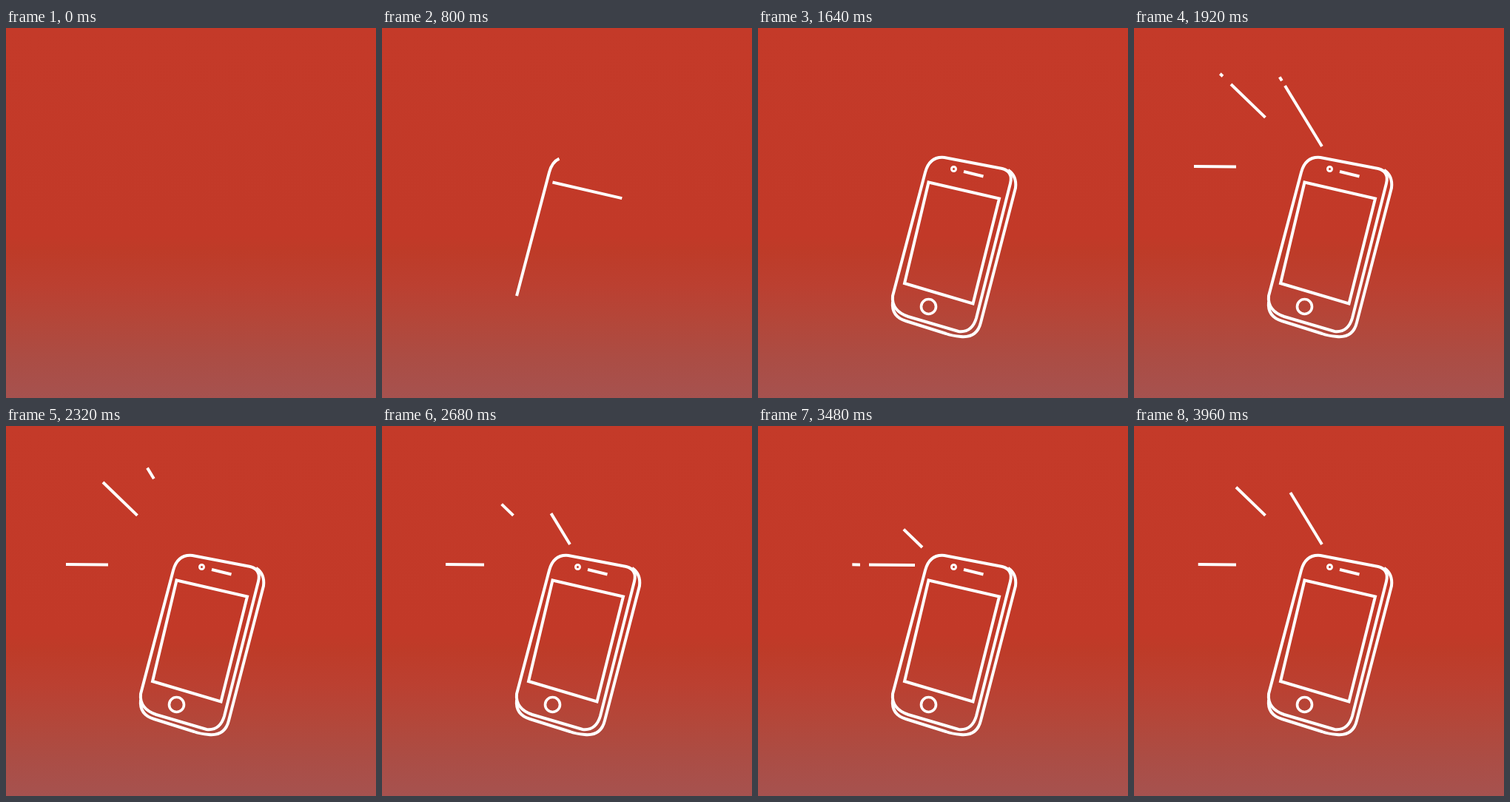
Write an HTML page with a canvas that moves like this. It is 500 by 500 pixels and loops after 4 s.

```html
<!DOCTYPE html>
<html lang="en">
<head>
<meta charset="utf-8">
<title>Ringing phone</title>
<style>
  html, body { margin: 0; width: 100%; height: 100%; overflow: hidden; background: #c33929; }
  canvas { display: block; width: 500px; height: 500px; }
</style>
</head>
<body>
<canvas id="stage" width="500" height="500"></canvas>
<script>
const ctx = document.getElementById('stage').getContext('2d');
const LOOP = 4000, STEP = 40;

const backdrop = ctx.createLinearGradient(0, 0, 0, 500);
[[0, '#c43a29'], [0.56, '#c23928'], [0.6, '#be3b28'], [0.7, '#bb4031'],
 [0.8, '#b3473a'], [0.9, '#ab4d45'], [1, '#a6524f']]
  .forEach(([at, color]) => backdrop.addColorStop(at, color));

// An outline that draws itself between two times.
function outline(d, start, end, width = 4) {
  const el = document.createElementNS('http://www.w3.org/2000/svg', 'path');
  el.setAttribute('d', d);
  return { path: new Path2D(d), length: el.getTotalLength(), start, end, width };
}

const circle = (x, y, r) =>
  `M${x - r},${y} a${r},${r} 0 1 1 ${2 * r},0 a${r},${r} 0 1 1 ${-2 * r},0 Z`;

const phone = [
  outline('M182,362 L226,195 Q232,173 252,175 L330,190 Q345,194 341,210 ' +
          'L295,392 Q289,412 271,410 L203,390 Q180,382 182,362 Z', 660, 1120),
  outline('M338,192 Q350,200 348,216 L301,398 Q296,419 274,417 ' +
          'Q262,416 254,413 L200,396 Q180,390 182,370', 800, 1290),
  outline('M230.5,208.5 L326,230.5 L290.5,372.5 L198,345 Z', 720, 1120),
  outline(circle(230.5, 376.5, 10), 840, 1120, 3.6),
  outline(circle(264.5, 190.5, 3), 1120, 1360, 3),
  outline('M278,194 L304.5,200.5', 1118, 1300)
];

// Rays: dashes are [from, to] distances along the line; hold keeps the last dash.
const SPEED = 0.7, LINGER = 24;
const rays = [
  { from: [212, 188], to: [81, 187], hold: 90, dashes: [[0, 62], [74, 131]],
    starts: [1642, 2110, 2500, 2861, 3105, 3359, 3781] },
  { from: [222, 164], to: [131, 76], hold: 24, dashes: [[0, 48], [62, 126.6], [142, 164]],
    starts: [1710, 2130, 2560, 2921, 3175, 3430, 3793] },
  { from: [254, 160], to: [204, 78], hold: 24, dashes: [[0, 96], [104, 147]],
    starts: [1763, 2147, 2610, 2967, 3230, 3490, 3843] }
];

function drawOutline({ path, length, start, end, width }, t) {
  const shown = Math.min(1, (t - start) / (end - start));
  if (shown <= 0) return;
  ctx.lineWidth = width;
  ctx.setLineDash(shown < 1 ? [length * shown, length * 2] : []);
  ctx.stroke(path);
}

function drawRay({ from, to, hold, dashes, starts }, t) {
  const start = starts.filter(s => s <= t).pop();
  if (start === undefined) return;
  const head = (t - start) * SPEED;
  const dx = to[0] - from[0], dy = to[1] - from[1], size = Math.hypot(dx, dy);
  const point = d => [from[0] + dx / size * d, from[1] + dy / size * d];
  dashes.forEach(([near, far], i) => {
    const linger = i === dashes.length - 1 ? hold : LINGER;
    if (head <= near || head > far + linger) return;
    ctx.beginPath();
    ctx.moveTo(...point(near));
    ctx.lineTo(...point(Math.min(head, far)));
    ctx.stroke();
  });
}

function draw() {
  const t = Math.floor(performance.now() % LOOP / STEP) * STEP;
  ctx.fillStyle = backdrop;
  ctx.fillRect(0, 0, 500, 500);
  ctx.strokeStyle = '#fff';
  phone.forEach(part => drawOutline(part, t));
  ctx.setLineDash([]);
  ctx.lineWidth = 4;
  rays.forEach(ray => drawRay(ray, t));
  requestAnimationFrame(draw);
}
draw();
</script>
</body>
</html>
```
